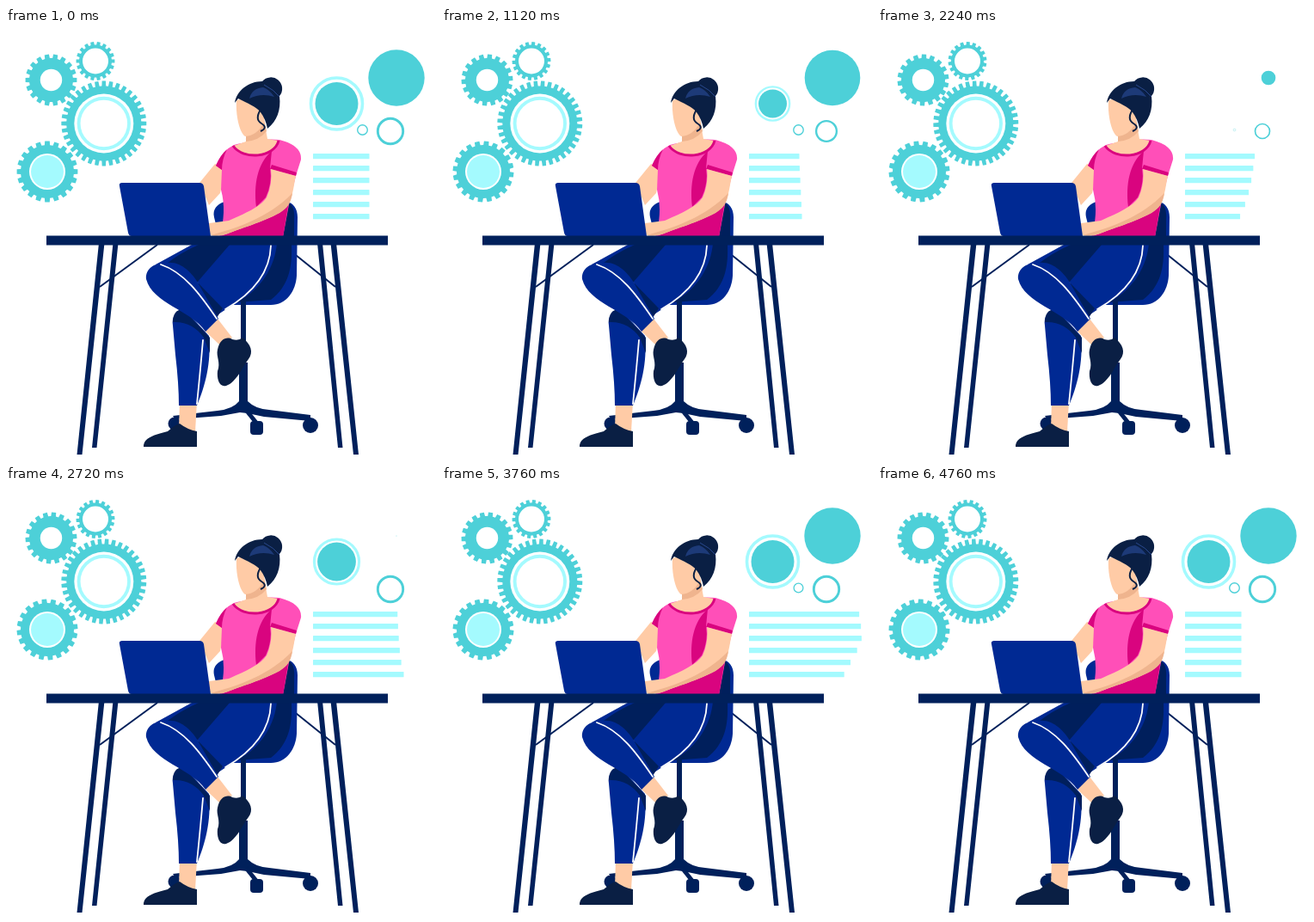
An HTML page for the animation above (4800 ms loop, 500 px wide and 500 px high).

```html
<!DOCTYPE html>
<html lang="en">
<head>
<meta charset="utf-8">
<title>Working at a desk</title>
<style>
html, body { margin: 0; width: 100%; height: 100%; overflow: hidden; background: #fff; }
svg { display: block; width: 100vw; height: 100vh; }
.navy { fill: #00205b; }
.ink { fill: #0a1f44; }
.blue { fill: #002993; }
.shade { fill: #001f5c; }
.skin { fill: #ffcba6; }
.tan { fill: #efb48e; }
.pink { fill: #ff4fb8; }
.rose { fill: #d9047f; }
.teal { fill: #4dd0d8; }
.pale { fill: #a4fafe; }
.white { fill: #fff; }
.stripe { fill: none; stroke: #fff; stroke-width: 1.8; stroke-linecap: round; }
.line { fill: none; stroke: #00205b; }
</style>
</head>
<body>
<svg viewBox="0 0 500 500" xmlns="http://www.w3.org/2000/svg">
  <g id="gears"></g>
  <g id="bars"></g>

  <g id="bubbles">
    <circle class="teal" r="32.7"/>
    <circle r="30" fill="none" stroke="#a4fafe" stroke-width="3.6"/>
    <circle class="teal" r="25"/>
    <circle r="5.8" fill="none" stroke="#4dd0d8" stroke-width="1.4"/>
    <circle r="14.7" fill="none" stroke="#4dd0d8" stroke-width="2.9"/>
  </g>

  <g id="chair">
    <path class="line" stroke-width="2" d="M176 252L109 301M322 252L383 301"/>
    <path class="blue" d="M254 202C245 205 240 211 242 220L244 228H256ZM326 202C334 203 339 210 339 220L338 288C337 306 326 322 308 322H262V250H318Z"/>
    <path class="shade" d="M326 202C333 204 336 212 335 222V250H318ZM310 252H332C333 278 329 300 308 316L268 319Z"/>
    <path class="navy" d="M273 318H279V389H281V439H271V389H273Z"/>
    <path class="navy" d="M271 434H281Q290 443 306 444L354 450V457L300 452 281 448 272 447 250 451 197 455 194 451 246 445Q264 443 271 434Z"/>
    <circle class="navy" cx="354" cy="462" r="9"/>
    <circle class="navy" cx="196" cy="460" r="7.5"/>
    <rect class="navy" x="284" y="457" width="15" height="16" rx="4"/>
    <path class="line" stroke-width="5" d="M279 444L291 459"/>
  </g>

  <g id="legs">
    <path class="skin" d="M202 434H222L220 470 201 466Z"/>
    <path class="ink" d="M160 487C160 476 173 473 188 469Q197 461 202 460 211 467 222 469V487Z"/>
    <path class="blue" d="M194 346C192 334 200 327 212 332L236 358C239 390 231 418 222 439H201Q201 414 197 380Z"/>
    <path class="shade" d="M194 342C194 331 200 326 207 328L237 360V378L230 360C222 348 209 341 194 342Z"/>
    <path class="stripe" d="M229 363Q226 398 222 437"/>
    <path class="blue" d="M222 294L254 250H315C313 276 298 303 270 318L242 336Z"/>
    <path class="stripe" d="M308 253C307 283 288 308 255 327"/>
    <path class="shade" d="M221 294L252 326 245 337Z"/>
    <path class="blue" d="M174 275L216 252H260L222 296Z"/>
    <path class="shade" d="M188 273C201 263 213 257 224 252H260L222 296Z"/>
    <path class="skin" d="M230 351L246 338 263 360 249 369Z"/>
    <path class="ink" d="M246 374C249 360 258 359 263 362Q271 364 275 360C285 368 288 377 282 385C275 394 268 412 256 416C248 418 245 408 246 399C250 389 244 382 246 374Z"/>
    <path class="blue" d="M163 292C162 280 172 273 187 273C204 271 217 286 223 296L247 338 232 353C214 327 171 321 163 292Z"/>
    <path class="stripe" d="M180 275C207 284 226 310 245 338"/>
  </g>

  <g id="body">
    <path class="skin" d="M243 158L255 164 249 192 236 206 225 180Z"/>
    <path class="pink" d="M265 136C280 132 302 128 318 130C337 135 344 143 343 153L337 172 330 200 322 243H248Q257 214 250 188L251 165 244 160Q252 142 265 136Z"/>
    <path class="rose" d="M257 141Q249 148 244 160L251 165Q251 153 257 141Z"/>
    <path class="rose" d="M309 143L307 163Q310 180 302 197L291 208C288 182 292 158 309 143Z"/>
    <path class="rose" d="M309 159L338 168 337 172 307 164ZM330 196L322 243H248L300 222Z"/>
    <path class="skin" d="M279 122L301 112 304 129 316 131C314 143 292 152 274 145Q267 141 265 137L279 132Z"/>
    <path class="tan" d="M279 125Q292 121 300 106L303 120Q294 131 279 132Z"/>
    <path fill="none" stroke="#d9047f" stroke-width="3" d="M264 137C276 154 312 151 317 131"/>
    <path class="skin" d="M268 84C267 101 271 121 278 126Q292 125 300 110L301 88 284 80Z"/>
    <path class="ink" d="M266 87C268 73 282 62 298 62A12 12 0 1 1 318 79C320 96 315 108 304 117Q302 106 296 98C291 91 281 88 270 82Z"/>
    <path fill="#1d3a78" d="M283 82Q286 70 299 69 307 72 312 80 297 75 283 82Z"/>
    <path fill="none" stroke="#0a1f44" stroke-width="2" d="M296 95Q289 106 297 111T296 120"/>
    <path fill="none" stroke="#3154a0" stroke-width=".8" d="M300 66Q312 72 318 80"/>
    <path class="skin" d="M308 164L337 172C333 190 334 204 318 215C300 225 270 234 258 239Q244 244 236 240V227L259 224C277 216 296 208 303 197Q310 181 308 164Z"/>
    <path class="tan" d="M333 192C331 204 328 209 318 215C300 225 270 234 258 239Q248 243 238 241C266 233 304 222 333 192Z"/>
  </g>

  <g id="desk">
    <path class="blue" d="M135 180H225Q229 180 230 184L238 242H146Q143 242 142 238L132 184Q131 180 135 180Z"/>
    <path class="navy" d="M108 250H114.500L88.500 496H82.500ZM124.500 250H130.500L105.500 488H100ZM362 250H368L391.500 488H386ZM377.500 250H384L410 496H404Z"/>
    <rect class="navy" x="47" y="241.500" width="397" height="11"/>
  </g>
</svg>

<script>
const LOOP = 4800, STEP = 40;
const NS = "http://www.w3.org/2000/svg";

function add(parent, tag, attrs) {
  const el = document.createElementNS(NS, tag);
  for (const key in attrs) el.setAttribute(key, attrs[key]);
  return parent.appendChild(el);
}

// Eased value at time t along [time, value] steps.
function track(steps, t) {
  if (t <= steps[0][0]) return steps[0][1];
  for (let i = 1; i < steps.length; i++) {
    const [t0, a] = steps[i - 1], [t1, b] = steps[i];
    if (t < t1) {
      const u = (t - t0) / (t1 - t0);
      return a + (b - a) * u * u * (3 - 2 * u);
    }
  }
  return steps[steps.length - 1][1];
}

function gearPath(teeth, root, tip) {
  const pitch = 2 * Math.PI / teeth, points = [];
  for (let i = 0; i < teeth; i++) {
    for (const [r, part] of [[root, -.32], [tip, -.25], [tip, .25], [root, .32]]) {
      const a = (i + part) * pitch;
      points.push((r * Math.cos(a)).toFixed(2) + " " + (r * Math.sin(a)).toFixed(2));
    }
  }
  return "M" + points.join("L") + "Z";
}

const gears = [
  { x: 52.5, y: 60.5, teeth: 18, root: 25.5, tip: 30, turn: -1, discs: [["white", 12.7]] },
  { x: 104, y: 38.5, teeth: 18, root: 19, tip: 22.5, turn: -1, discs: [["white", 15]] },
  { x: 113.8, y: 111, teeth: 36, root: 43.5, tip: 49.5, turn: 1,
    discs: [["white", 34.5], ["pale", 31.2], ["white", 27.3]] },
  { x: 48, y: 167, teeth: 20, root: 31, tip: 35.5, turn: -1,
    discs: [["white", 21], ["pale", 19]] }
].map(g => {
  const group = add(document.getElementById("gears"), "g", { transform: `translate(${g.x} ${g.y})` });
  const wheel = add(group, "path", { class: "teal", d: gearPath(g.teeth, g.root, g.tip) });
  for (const [name, r] of g.discs) add(group, "circle", { class: name, r });
  return { wheel, turn: g.turn };
});

const bars = Array.from({ length: 6 }, (_, i) => ({
  el: add(document.getElementById("bars"), "rect",
    { class: "pale", x: 357, y: 146 + i * 14, height: 6.3, rx: .6 }),
  steps: [[0, 65.5], [1130 + 184 * i, 58.5], [4116 - 190 * i, 131], [4770, 65.5]]
}));

const shapes = document.getElementById("bubbles").children;
const bubbles = [
  [454, 58, [[1000, 1], [2850, 0], [3450, 1]]],
  [384.5, 88, [[409, 1], [2210, 0], [2870, 1]]],
  [384.5, 88, [[373, 1], [2280, 0], [2830, 1]]],
  [414.5, 118.5, [[1000, 1], [2800, 0], [3140, 0], [3880, 1]]],
  [447, 120, [[560, 1], [2000, .43], [2720, 1]]]
].map(([x, y, steps], i) => ({ el: shapes[i], x, y, steps }));

function draw(t) {
  for (const { wheel, turn } of gears)
    wheel.setAttribute("transform", `rotate(${turn * 360 * t / LOOP})`);
  for (const { el, steps } of bars) el.setAttribute("width", track(steps, t));
  for (const { el, x, y, steps } of bubbles)
    el.setAttribute("transform", `translate(${x} ${y}) scale(${track(steps, t)})`);
}

let start;
function tick(now) {
  start ??= now;
  draw(Math.floor((now - start) % LOOP / STEP) * STEP);
  requestAnimationFrame(tick);
}
draw(0);
requestAnimationFrame(tick);
</script>
</body>
</html>
```
